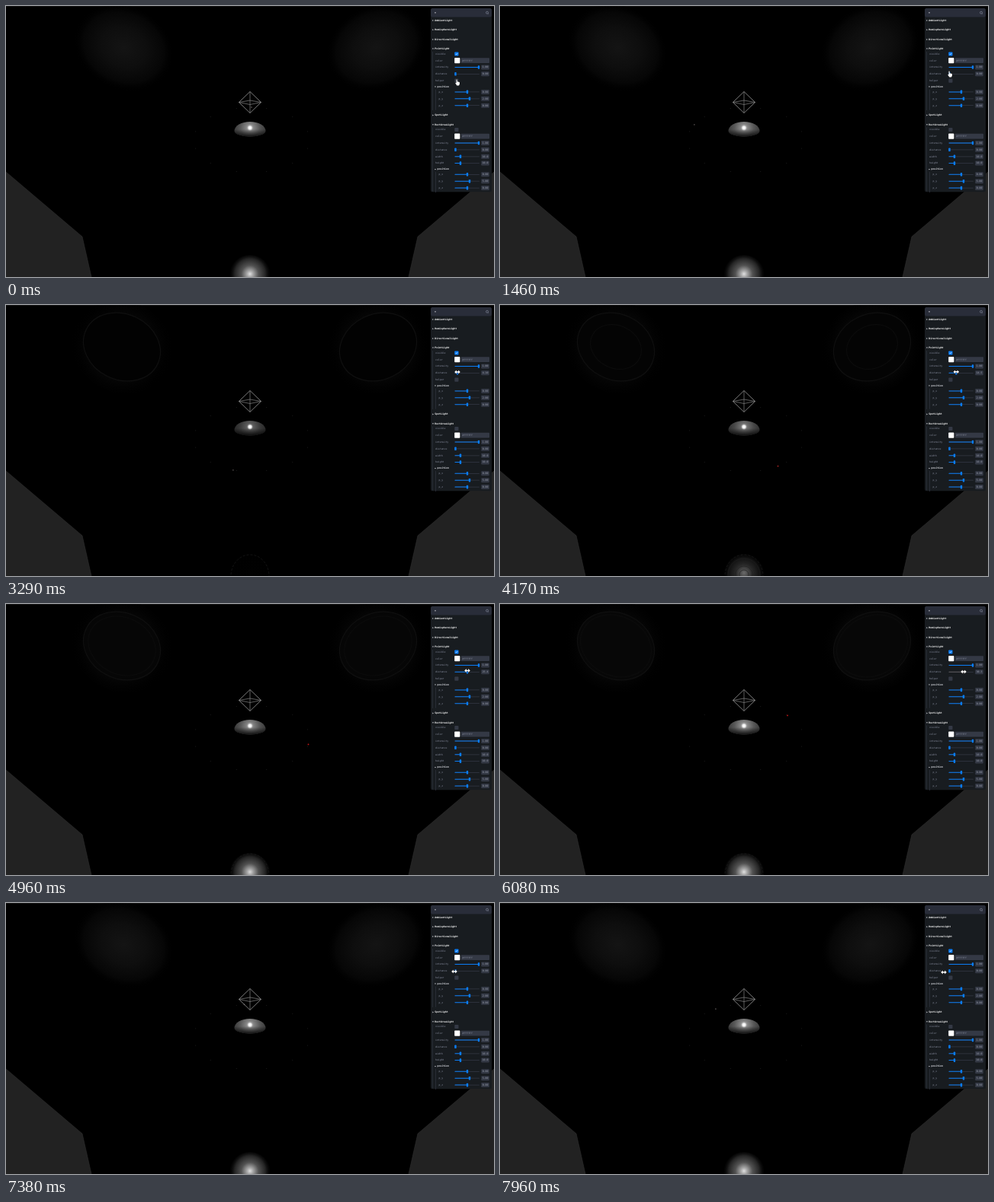
Animation of 640x356 px, one loop 8000 ms. Source, as an HTML page with a canvas:

```html
<!DOCTYPE html>
<html lang="en">
<head>
<meta charset="utf-8">
<title>Point light controls</title>
<style>
html, body { margin: 0; width: 100%; height: 100%; overflow: hidden; background: #000; }
canvas { display: block; width: 640px; height: 356px; }
</style>
</head>
<body>
<canvas id="stage"></canvas>
<script>
const W = 640, H = 356, LOOP = 8000;
const canvas = document.getElementById('stage');
const ctx = canvas.getContext('2d');
const dpr = window.devicePixelRatio || 1;
canvas.width = W * dpr;
canvas.height = H * dpr;

const MONO = '"DejaVu Sans Mono", "Noto Sans Mono", monospace';
const BLUE = '#0a7cf5', FIELD = '#343945', LABEL = '#8c92a4', MUTED = '#5e5a5c';
const TRACK_MIN = 589.5, TRACK_MAX = 620, MAX_DISTANCE = 50;

// [time, value...] rows
const handleKeys = [[1720, 589.5], [1790, 590.4], [2460, 591.4], [2710, 591.4], [3290, 592],
  [3540, 593], [4960, 605], [5500, 609], [6080, 608], [6880, 597], [7380, 589.5]];
const cursorKeys = [[0, 592, 100], [80, 592, 100], [420, 591, 67], [560, 591, 67], [860, 590, 88],
  [1460, 590, 89], [1720, 590, 88], [3290, 592, 88], [3540, 593, 88], [4960, 605, 87.5],
  [5500, 609, 88], [6080, 608, 89], [6880, 597, 89], [7380, 588, 90], [7960, 582, 91]];

const clamp = (v, a = 0, b = 1) => Math.min(b, Math.max(a, v));
const gray = (v, a = 1) => `rgba(${v},${v},${v},${a})`;

function sample(keys, t, col = 1) {
  if (t <= keys[0][0]) return keys[0][col];
  for (let i = 1; i < keys.length; i++) {
    const a = keys[i - 1], b = keys[i];
    if (t <= b[0]) return a[col] + (b[col] - a[col]) * (t - a[0]) / (b[0] - a[0]);
  }
  return keys[keys.length - 1][col];
}

function poly(points, close = true) {
  ctx.beginPath();
  points.forEach(([x, y]) => ctx.lineTo(x, y));
  if (close) ctx.closePath();
}

function ellipse(x, y, rx, ry, rot = 0) {
  ctx.beginPath();
  ctx.ellipse(x, y, rx, ry, rot, 0, Math.PI * 2);
}

function box(x, y, w, h, r, color) {
  ctx.fillStyle = color;
  ctx.beginPath();
  ctx.roundRect(x, y, w, h, r);
  ctx.fill();
}

function radial(x, y, r, stops) {
  const g = ctx.createRadialGradient(x, y, 0, x, y, r);
  stops.forEach(([at, color]) => g.addColorStop(at, color));
  return g;
}

function text(s, x, y, color = LABEL, bold = false) {
  ctx.font = `${bold ? 'bold ' : ''}3.2px ${MONO}`;
  ctx.fillStyle = color;
  ctx.fillText(s, x, y);
}

// Light patch on an upper wall; a finite range leaves a dark disc with a rim.
function wallPatch(side, d) {
  ctx.save();
  ctx.translate(320 + side * 168, 55);
  ctx.scale(side, 1);
  ctx.rotate(-0.45);
  if (d === 0) {
    ctx.scale(1, 0.82);
    ctx.fillStyle = radial(-2, -2, 68, [[0, gray(20)], [0.45, gray(14)], [0.8, gray(6)], [1, gray(0, 0)]]);
    ellipse(0, 0, 68, 68);
    ctx.fill();
  } else {
    const reach = clamp(d / 28);
    ctx.fillStyle = radial(0, 0, 68, [[0.6, gray(7)], [1, gray(0, 0)]]);
    ellipse(0, 0, 68, 60);
    ctx.fill();
    ctx.fillStyle = gray(Math.round(1 + 6 * reach));
    ellipse(0, 0, 52, 43);
    ctx.fill();
    ctx.lineWidth = 1.2;
    ctx.strokeStyle = gray(15);
    ctx.stroke();
    if (reach > 0.2) {
      ctx.strokeStyle = gray(11);
      ellipse(0, 0, 48 * Math.sqrt(reach), 39 * Math.sqrt(reach));
      ctx.stroke();
    }
  }
  ctx.restore();
}

function floorBall(d) {
  const level = d === 0 ? 1 : clamp((d - 4) / 22);
  if (level > 0) {
    ctx.save();
    ctx.globalAlpha = level;
    ctx.fillStyle = radial(320, 352, 28, [[0, gray(225)], [0.15, gray(165)], [0.4, gray(82)],
      [0.72, gray(36)], [1, gray(0, 0)]]);
    ellipse(320, 354, 27, 27);
    ctx.fill();
    ctx.restore();
  }
  if (d === 0) return;
  ctx.lineWidth = 0.7;
  ctx.strokeStyle = gray(32, 0.9);
  ctx.setLineDash([3, 2]);
  ellipse(320, 356, 25, 28);
  ctx.stroke();
  ctx.setLineDash([]);
  if (level > 0.05 && level < 0.7) {
    for (let r = 6; r < 24; r += 5) {
      ellipse(320, 354, r, r);
      ctx.stroke();
    }
  }
}

function centerBall(d) {
  const k = d === 0 ? 1 : 0.62 + 0.38 * clamp(d / 28);
  const tone = v => gray(Math.round(v * k));
  ctx.beginPath();
  ctx.ellipse(320, 164, 20.5, 12, 0, Math.PI, Math.PI * 2);
  ctx.ellipse(320, 164, 20.5, 7.5, 0, 0, Math.PI);
  ctx.fillStyle = radial(320, 160, 21, [[0, tone(185)], [0.25, tone(130)], [0.6, tone(88)], [1, tone(58)]]);
  ctx.fill();
  const fade = ctx.createLinearGradient(0, 162, 0, 172);
  fade.addColorStop(0, gray(0, 0));
  fade.addColorStop(1, gray(0, 0.85));
  ctx.fillStyle = fade;
  ctx.fill();
  ctx.fillStyle = radial(320, 160, 4, [[0, '#fff'], [0.45, '#f4f4f4'], [1, gray(200, 0)]]);
  ellipse(320, 160, 4, 4);
  ctx.fill();
}

function lightHelper() {
  const left = [305.5, 126.5], right = [334.5, 126.5], top = [320, 112.5], bottom = [320, 140.5];
  const front = [320, 129.5], back = [320, 124];
  ctx.lineWidth = 0.7;
  ctx.strokeStyle = '#b4b4b4';
  poly([left, top, right, bottom]);
  ctx.stroke();
  ctx.strokeStyle = '#858585';
  poly([left, back, right, front]);
  ctx.stroke();
  poly([top, bottom], false);
  ctx.stroke();
}

function ringPoint(phi) {
  return [322 + 76 * Math.cos(phi), 176 - 43 * Math.sin(phi)];
}

function ring(t) {
  ctx.fillStyle = '#1b1b1b';
  for (let i = 0; i < 12; i++) {
    const [x, y] = ringPoint((i + 0.5) * Math.PI / 6);
    ctx.fillRect(x - 0.5, y - 0.5, 1, 1);
  }
  // Circle seen in perspective: the near side moves faster.
  const theta = (90 + t * 0.05) * Math.PI / 180;
  const phi = theta + 0.2 * Math.cos(theta);
  const [x, y] = ringPoint(phi);
  const red = clamp(Math.cos(phi) * 1.3);
  ctx.fillStyle = `rgb(${Math.round(75 + 130 * red)},${Math.round(70 - 50 * red)},${Math.round(70 - 50 * red)})`;
  ellipse(x, y, 0.9, 0.9);
  ctx.fill();
}

function scene(t, d) {
  ctx.fillStyle = '#000';
  ctx.fillRect(0, 0, W, H);
  ctx.fillStyle = '#141414';
  ctx.fillRect(0, 0, W, 1);
  wallPatch(-1, d);
  wallPatch(1, d);
  for (const side of [-1, 1]) {
    const mx = x => side < 0 ? x : W - x;
    poly([[mx(0), 218], [mx(100), 303], [mx(112), 356], [mx(0), 356]]);
    ctx.fillStyle = '#222';
    ctx.fill();
    ctx.lineWidth = 0.6;
    ctx.strokeStyle = '#303030';
    poly([[mx(0), 218], [mx(100), 303], [mx(112), 356]], false);
    ctx.stroke();
  }
  floorBall(d);
  ring(t);
  centerBall(d);
  lightHelper();
}

function arrow(x, y, open) {
  ctx.fillStyle = '#c8cad0';
  poly(open ? [[x - 1, y - 0.7], [x + 1, y - 0.7], [x, y + 0.9]]
            : [[x - 0.7, y - 1], [x - 0.7, y + 1], [x + 0.9, y]]);
  ctx.fill();
}

function section(name, y, open = false) {
  arrow(560, y, open);
  text(name, 562.3, y, '#fdfdfd', true);
}

function checkbox(y, on) {
  box(588.3, y - 2.6, 5.2, 5.2, 0.8, on ? BLUE : FIELD);
  if (!on) return;
  ctx.lineWidth = 0.6;
  ctx.strokeStyle = '#fff';
  poly([[589.7, y], [590.6, y + 1], [592.2, y - 1]], false);
  ctx.stroke();
}

function slider(name, y, x, value, indent = 0, fill = BLUE) {
  text(name, 563 + indent, y);
  box(588.5, y - 0.4, 32.5, 0.8, 0.4, FIELD);
  box(588.5, y - 0.5, x - 588.5, 1, 0.4, fill);
  box(x - 1.2, y - 2.3, 2.4, 4.6, 0.7, fill);
  box(623.2, y - 3, 10.6, 6, 0.8, FIELD);
  text(value, 624.7, y, '#a0a5b4');
}

function colorRow(y) {
  text('color', 563, y);
  box(588.2, y - 3.6, 7.2, 7.2, 0.8, '#fff');
  box(596.8, y - 3.4, 37.2, 6.8, 0.8, FIELD);
  text('#ffffff', 598.5, y);
}

function position(y, height) {
  arrow(563, y, true);
  text('position', 565.5, y, '#e4e6ec', true);
  ctx.fillStyle = FIELD;
  ctx.fillRect(563.2, y + 3.5, 0.6, 27);
  slider('p_x', y + 6.7, 605, '0.00', 4.5);
  slider('p_y', y + 15.6, 608, height, 4.5);
  slider('p_z', y + 24.5, 605, '0.00', 4.5);
}

function panel(t, handle, d) {
  box(557, 3, 80, 241.3, 2.5, '#181c20');
  box(557, 3, 80, 11.5, 2.5, '#292d39');
  arrow(563, 9, true);
  ctx.lineWidth = 0.6;
  ctx.strokeStyle = LABEL;
  ellipse(631, 8.7, 1.5, 1.5);
  ctx.stroke();
  poly([[632.1, 9.8], [633, 10.7]], false);
  ctx.stroke();

  ctx.fillStyle = FIELD;
  ctx.fillRect(559.4, 60, 0.6, 77);
  ctx.fillRect(559.4, 159.5, 0.6, 84);

  section('AmbientLight', 19);
  section('HemisphereLight', 31.3);
  section('DirectionalLight', 44);
  section('PointLight', 56.3, true);
  text('visible', 563, 63);
  checkbox(63, true);
  colorRow(71.7);
  slider('intensity', 80.5, 620, '1.00');
  const fill = t > 5250 && t < 7300 ? MUTED : BLUE;
  slider('distance', 89.3, handle, d < 10 ? d.toFixed(2) : d.toFixed(1), 0, fill);
  text('helper', 563, 98.2);
  checkbox(98.2, false);
  position(106.2, '2.00');

  section('SpotLight', 143.6);
  section('RectAreaLight', 156, true);
  text('visible', 563, 162.5);
  checkbox(162.5, false);
  colorRow(171.2);
  slider('intensity', 180, 620, '1.00');
  slider('distance', 188.8, 589.5, '0.00');
  slider('width', 197.8, 596, '10.0');
  slider('height', 206.6, 596, '10.0');
  position(214.6, '5.00');
}

function cursor(t) {
  const x = sample(cursorKeys, t, 1), y = sample(cursorKeys, t, 2);
  ctx.save();
  ctx.translate(x, y);
  ctx.lineWidth = 0.7;
  ctx.fillStyle = '#fff';
  ctx.strokeStyle = '#111';
  if (t < 1720) {
    poly([[-1.5, -3.5], [-0.4, -3.5], [-0.2, -0.7], [2.8, 0], [3, 2.3], [2, 4.4], [-0.7, 4.4], [-2.8, 1.2], [-1.4, 0.7]]);
  } else {
    poly([[-3.8, 0], [-1.2, -2.4], [-1.2, -0.7], [1.2, -0.7], [1.2, -2.4], [3.8, 0],
      [1.2, 2.4], [1.2, 0.7], [-1.2, 0.7], [-1.2, 2.4]]);
  }
  ctx.stroke();
  ctx.fill();
  ctx.restore();
}

function draw(now) {
  const t = now % LOOP;
  const handle = sample(handleKeys, t);
  const d = (handle - TRACK_MIN) / (TRACK_MAX - TRACK_MIN) * MAX_DISTANCE;
  ctx.setTransform(dpr, 0, 0, dpr, 0, 0);
  ctx.textBaseline = 'middle';
  scene(t, d);
  panel(t, handle, d);
  cursor(t);
}

const start = performance.now();
function tick() {
  draw(performance.now() - start);
  requestAnimationFrame(tick);
}
tick();
</script>
</body>
</html>
```
